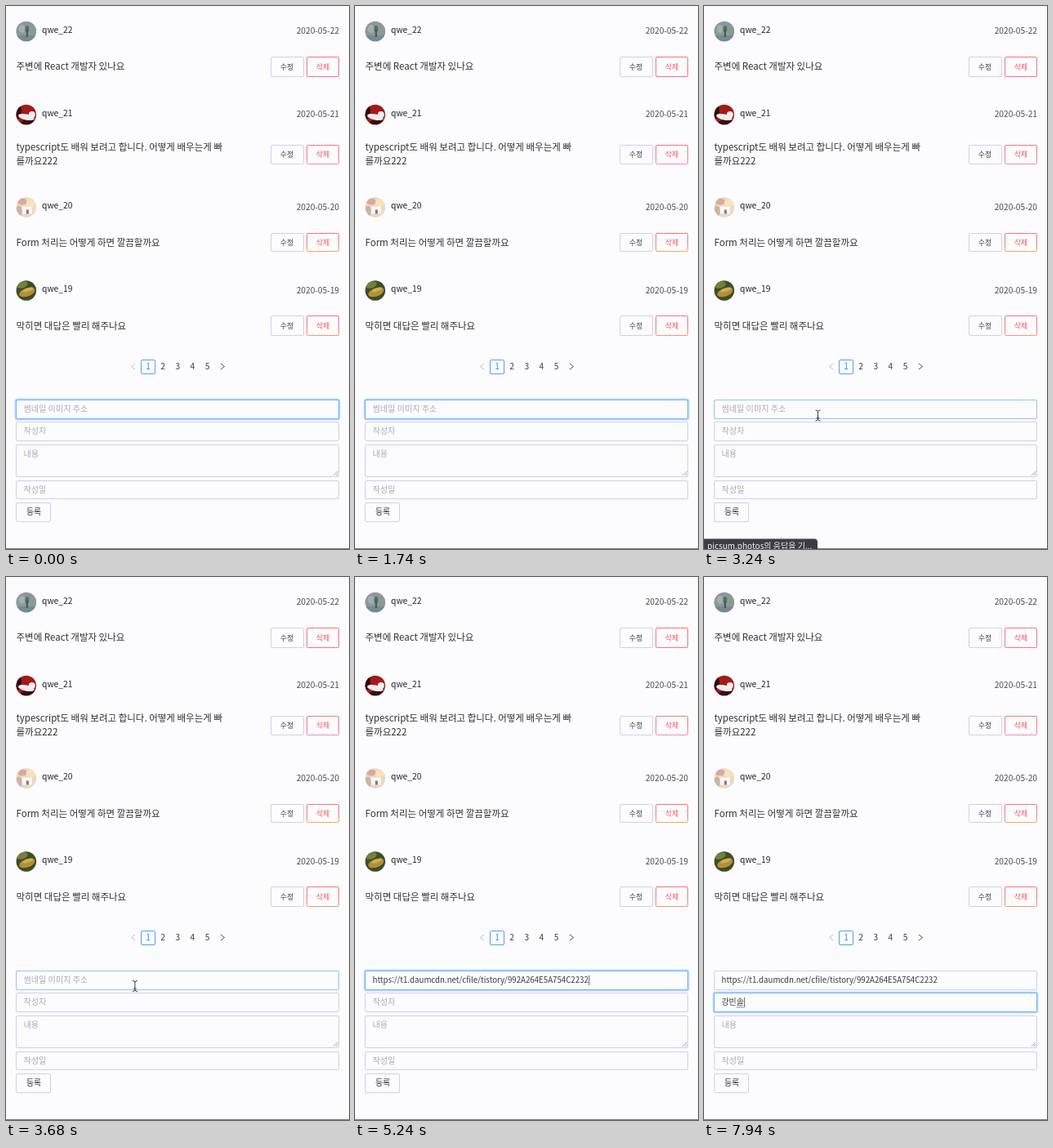
Recreate the animation shown at these times as an HTML page with a canvas. Size 420x665 px, loop 8000 ms.

```html
<!DOCTYPE html>
<html lang="ko">
<head>
<meta charset="utf-8">
<title>Comment board</title>
<style>
html, body { margin: 0; width: 100%; height: 100%; overflow: hidden; background: #fcfcff; }
canvas { display: block; width: 420px; height: 665px; }
</style>
</head>
<body>
<canvas id="stage"></canvas>
<script>
const W = 420, H = 665, LOOP = 8000;
const FONT = '"Noto Sans CJK KR", "Noto Sans CJK", "Noto Sans", sans-serif';
const BG = '#fcfcff', LINE = '#d0cdf2', BLUE = '#559ff8';
const canvas = document.getElementById('stage');
const ctx = canvas.getContext('2d');
const dpr = window.devicePixelRatio || 1;
canvas.width = W * dpr;
canvas.height = H * dpr;

const rows = [
  { id: 'qwe_22', date: '2020-05-22', y: 28.5, lines: ['주변에 React 개발자 있나요'], textY: 78, btn: 62, btnH: 25, edge: '#fb7482', loaded: 2540 },
  { id: 'qwe_21', date: '2020-05-21', y: 130.5, lines: ['typescript도 배워 보려고 합니다. 어떻게 배우는게 빠', '를까요222'], textY: 176.5, btn: 170, btnH: 24, edge: '#f98fb4', loaded: 2700 },
  { id: 'qwe_20', date: '2020-05-20', y: 244, lines: ['Form 처리는 어떻게 하면 깔끔할까요'], textY: 293.5, btn: 278, btnH: 23, edge: '#fba85c', loaded: 2820 },
  { id: 'qwe_19', date: '2020-05-19', y: 346, lines: ['막히면 대답은 빨리 해주나요'], textY: 395.5, btn: 379, btnH: 25, edge: '#fb9a62', loaded: 2920 }
];
const fields = [
  { y: 482, h: 24, hint: '썸네일 이미지 주소' },
  { y: 509, h: 24, hint: '작성자' },
  { y: 537, h: 40, hint: '내용' },
  { y: 581, h: 23, hint: '작성일' }
];
const ADDRESS = 'https://t1.daumcdn.net/cfile/tistory/992A264E5A754C2232';
const RELOAD = 2160, CLICK = 3900, PASTE = 4900, TAB = 5400;

// Korean input, one composition step per key press
const keys = [
  [6160, 'ㅇ'], [6220, '이'], [6360, 'ㅇ'], [6480, ''],
  [6640, 'ㄱ'], [6740, '가'], [6860, '강'],
  [7020, '강ㅂ'], [7120, '강비'], [7240, '강빈'],
  [7380, '강빈ㅅ'], [7500, '강빈소'], [7640, '강빈솔']
];
const pathOut = [[60, 424, 560], [400, 372, 420], [820, 268, 170], [1400, 176, -18]];
const pathIn = [[2220, 172, -18], [2580, 189.5, 222], [2900, 168, 420], [3240, 139.5, 501.5], [3700, 158, 501], [4100, 164.5, 499.5], [4900, 164.5, 499.5]];

const clamp = v => Math.max(0, Math.min(1, v));
const ease = v => { v = clamp(v); return v * v * (3 - 2 * v); };

function along(path, t) {
  if (t < path[0][0] || t >= path[path.length - 1][0]) return null;
  const i = path.findIndex(p => t < p[0]);
  const [t0, x0, y0] = path[i - 1], [t1, x1, y1] = path[i];
  const k = ease((t - t0) / (t1 - t0));
  return { x: x0 + (x1 - x0) * k, y: y0 + (y1 - y0) * k };
}

function text(str, x, y, size, color, align = 'left', weight = 400) {
  ctx.font = `${weight} ${size}px ${FONT}`;
  ctx.fillStyle = color;
  ctx.textAlign = align;
  ctx.fillText(str, x, y);
  return ctx.measureText(str).width;
}

function box(x, y, w, h, color, r = 1.5) {
  ctx.beginPath();
  ctx.roundRect(x + 0.5, y + 0.5, w - 1, h - 1, r);
  ctx.strokeStyle = color;
  ctx.lineWidth = 1;
  ctx.stroke();
}

function rect(color, x, y, w, h) {
  ctx.fillStyle = color;
  ctx.fillRect(x, y, w, h);
}

function blob(color, x, y, rx, ry, turn = 0) {
  ctx.fillStyle = color;
  ctx.beginPath();
  ctx.ellipse(x, y, rx, ry, turn, 0, Math.PI * 2);
  ctx.fill();
}

const photos = [
  () => {
    rect('#8e959f', -13, -13, 26, 26);
    rect('#8a9c92', -13, -5, 26, 9);
    rect('#768a92', -13, 5, 26, 8);
    blob('#a4adb2', -5, -3, 4, 5);
    blob('#54705f', 1, -3, 2.5, 4);
    rect('#3e564c', 0, -2, 2, 9);
  },
  () => {
    rect('#a31a1a', -13, -13, 26, 26);
    blob('#2c0c10', -10, -4, 4, 9);
    blob('#301014', 3, 10, 10, 4);
    blob('#f3ecea', 0, 3, 10, 3.6, 0.2);
    blob('#f5efee', 7, 0, 4, 4);
  },
  () => {
    rect('#ead9c2', -13, -13, 26, 26);
    blob('#d9a99a', -5, -7, 6, 4);
    blob('#f4e3bd', 6, -6, 6, 5);
    blob('#c9b5a4', -9, 5, 4, 7);
    rect('#faf7f4', -5, -1, 12, 9);
    rect('#7f7590', 0, 3, 3, 5);
  },
  () => {
    rect('#3d4f26', -13, -13, 26, 26);
    blob('#74803c', -5, -7, 7, 4, -0.3);
    blob('#b48f38', 1, 2, 10, 5, -0.35);
    blob('#d0ae55', 2, -1, 7, 2, -0.35);
  }
];

function avatar(i, y) {
  ctx.save();
  ctx.translate(24.8, y);
  ctx.beginPath();
  ctx.arc(0, 0, 12.3, 0, Math.PI * 2);
  ctx.clip();
  photos[i]();
  ctx.restore();
}

function row(r, i, t) {
  if (t < RELOAD || t >= r.loaded) avatar(i, r.y + 2.5);
  text(r.id, 44, r.y + 4, 10.3, '#222226', 'left', 500);
  text(r.date, 408, r.y + 5.5, 10.2, '#4a4a50', 'right');
  r.lines.forEach((s, n) => text(s, 12.5, r.textY + n * 17.5, 11.5, '#30302d'));
  const mid = r.btn + r.btnH / 2 + 3;
  box(324, r.btn, 41, r.btnH, LINE);
  text('수정', 344, mid, 8.9, '#3c3c42', 'center');
  const g = ctx.createLinearGradient(0, r.btn, 0, r.btn + r.btnH);
  g.addColorStop(0, '#fb7478');
  g.addColorStop(0.5, '#fb7478');
  g.addColorStop(1, r.edge);
  box(368, r.btn, 40, r.btnH, g);
  text('삭제', 388, mid, 8.9, '#f25459', 'center');
}

function chevron(x, dir, color) {
  ctx.beginPath();
  ctx.moveTo(x - 2 * dir, 438);
  ctx.lineTo(x + 2.5 * dir, 441.5);
  ctx.lineTo(x - 2 * dir, 445);
  ctx.strokeStyle = color;
  ctx.lineWidth = 1;
  ctx.stroke();
}

function pager() {
  chevron(156, -1, '#bcbcc4');
  box(165, 433, 18, 18, BLUE);
  for (let n = 1; n <= 5; n++) {
    text(n, 156 + n * 18.1, 445.2, 10.2, n === 1 ? '#2e86f5' : '#3c3c42', 'center', n === 1 ? 500 : 400);
  }
  chevron(265, 1, '#4c4c52');
}

function typed(t) {
  let value = '', at = TAB;
  for (const [time, s] of keys) if (t >= time) [at, value] = [time, s];
  return { value, at };
}

// Strength of the focus ring on each field
function focusOf(i, t) {
  const fade = start => clamp((t - start) / 250);
  if (i === 0) return t < RELOAD ? 1 : t < TAB ? fade(CLICK) : 1 - fade(TAB);
  return i === 1 ? fade(TAB) : 0;
}

function caretOn(t, since) {
  return (t - since) % 1000 < 500;
}

function form(t, pointer) {
  const entry = typed(t);
  const values = [t >= PASTE ? ADDRESS : '', entry.value];
  fields.forEach((f, i) => {
    const focus = focusOf(i, t);
    const hover = pointer && pointer.y > f.y && pointer.y < f.y + f.h && pointer.x < 408;
    if (focus) {
      ctx.globalAlpha = focus;
      ctx.beginPath();
      ctx.roundRect(12, f.y, 396, f.h, 2);
      ctx.strokeStyle = '#b9dcfb';
      ctx.lineWidth = 3;
      ctx.stroke();
      ctx.globalAlpha = 1;
      rect(BG, 13, f.y + 1, 394, f.h - 2);
    }
    box(12, f.y, 396, f.h, LINE);
    if (focus || hover) {
      ctx.globalAlpha = hover ? 1 : focus;
      box(12, f.y, 396, f.h, focus ? '#6cb4fa' : '#9cc0f7');
      ctx.globalAlpha = 1;
    }
    const value = values[i] || '';
    const base = f.y + (i === 2 ? 15 : 14.5);
    const size = i === 0 ? 9.7 : 9.9;
    const width = value ? text(value, 21.5, base, size, '#38383e') : 0;
    if (!value) text(f.hint, 21.5, base, 10.1, '#aaa9b4');
    if (i === 1 && value) {
      const last = ctx.measureText(value.slice(-1)).width;
      rect('#6a6a72', 21.5 + width - last, base + 3, last, 0.8);
    }
    let since = null;
    if (i === 0 && t < RELOAD) since = 190;
    if (i === 0 && t >= CLICK && t < TAB) since = t < PASTE ? CLICK : PASTE;
    if (i === 1 && t >= TAB) since = entry.at;
    if (since !== null && t >= since && caretOn(t, since)) {
      rect('#404046', 22 + width, f.y + 6, 0.8, 12);
    }
  });
  ctx.beginPath();
  ctx.moveTo(401, 575);
  ctx.lineTo(406.5, 569.5);
  ctx.moveTo(404, 575);
  ctx.lineTo(406.5, 572.5);
  ctx.strokeStyle = '#8e8e96';
  ctx.lineWidth = 0.8;
  ctx.stroke();
  box(12, 608, 43, 24, LINE);
  text('등록', 34, 622.8, 9.9, '#303036', 'center');
}

function statusBar(t) {
  const show = clamp((t - 2680) / 120) * (1 - clamp((t - 3380) / 200));
  if (!show) return;
  ctx.globalAlpha = show;
  ctx.fillStyle = '#3d3d43';
  ctx.beginPath();
  ctx.roundRect(-4, 652.5, 143, 20, 4);
  ctx.fill();
  text('picsum.photos의 응답을 기...', 4, 664.5, 10, '#f0f0f4', 'left', 500);
  ctx.globalAlpha = 1;
}

function arrow({ x, y }) {
  const pts = [[0, 0], [0, 10.4], [2.3, 8.3], [4, 12], [5.6, 11.3], [4.1, 7.6], [7.2, 7.4]];
  ctx.beginPath();
  pts.forEach(([dx, dy]) => ctx.lineTo(x + dx, y + dy));
  ctx.closePath();
  ctx.lineJoin = 'round';
  ctx.strokeStyle = '#fff';
  ctx.lineWidth = 1.6;
  ctx.stroke();
  ctx.fillStyle = '#0c0c0e';
  ctx.fill();
}

function beam({ x, y }) {
  ctx.beginPath();
  ctx.moveTo(x - 3, y - 6.5);
  ctx.quadraticCurveTo(x, y - 6.5, x, y - 4.5);
  ctx.quadraticCurveTo(x, y - 6.5, x + 3, y - 6.5);
  ctx.moveTo(x, y - 4.5);
  ctx.lineTo(x, y + 4.5);
  ctx.moveTo(x - 3, y + 6.5);
  ctx.quadraticCurveTo(x, y + 6.5, x, y + 4.5);
  ctx.quadraticCurveTo(x, y + 6.5, x + 3, y + 6.5);
  ctx.moveTo(x - 1.8, y + 3);
  ctx.lineTo(x + 1.8, y + 3);
  ctx.strokeStyle = '#3c3c42';
  ctx.lineWidth = 1;
  ctx.stroke();
}

function draw(t) {
  ctx.setTransform(dpr, 0, 0, dpr, 0, 0);
  rect(BG, 0, 0, W, H);
  const pointer = along(pathOut, t) || along(pathIn, t);
  rows.forEach((r, i) => row(r, i, t));
  pager();
  form(t, pointer);
  rect('#77777e', 0, 664, W, 1);
  statusBar(t);
  if (pointer) (pointer.y > 482 && pointer.x < 408 ? beam : arrow)(pointer);
}

const start = performance.now();
function frame() {
  draw((performance.now() - start) % LOOP);
  requestAnimationFrame(frame);
}
frame();
</script>
</body>
</html>
```
